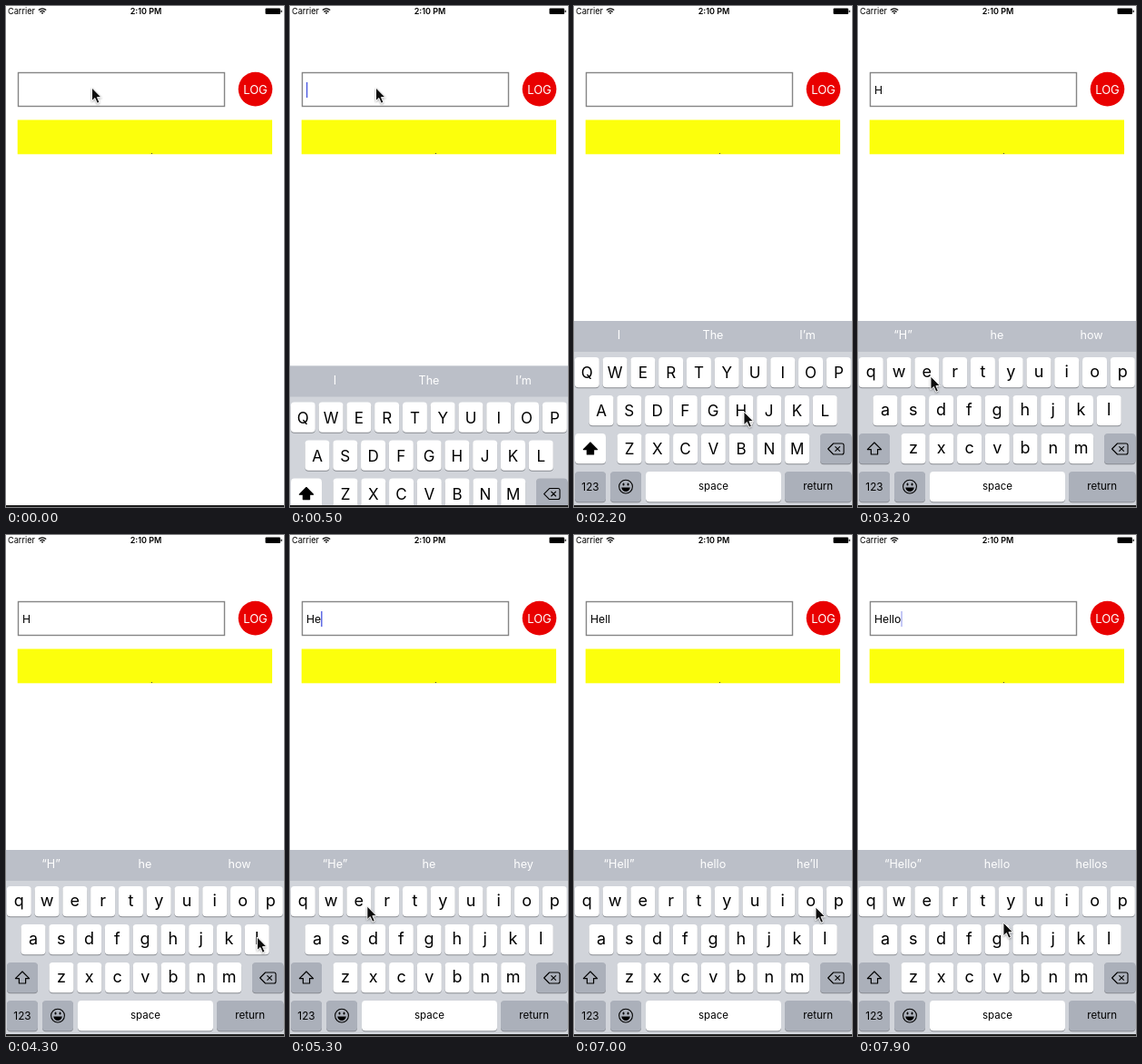
Recreate the animation shown at these times as an HTML page. Size 306x552 px, loop 8000 ms.

```html
<!DOCTYPE html>
<html lang="en">
<head>
<meta charset="utf-8">
<title>Typing on a phone keyboard</title>
<style>
  html, body { margin: 0; width: 100%; height: 100%; overflow: hidden; background: #fff; }
  svg { display: block; width: 306px; height: 552px; overflow: hidden; }
  text { font-family: Inter, Roboto, "Liberation Sans", sans-serif; white-space: pre; }
  .mid { text-anchor: middle; }
</style>
</head>
<body>
<svg id="stage" viewBox="0 0 306 552" xmlns="http://www.w3.org/2000/svg">
  <defs>
    <filter id="soft" x="-50%" y="-50%" width="200%" height="200%">
      <feDropShadow dx="0" dy="1" stdDeviation="1.2" flood-color="#000" flood-opacity=".4"/>
    </filter>
  </defs>
  <rect width="306" height="552" fill="#fff"/>

  <!-- status bar -->
  <text x="2" y="9.2" font-size="9.2">Carrier</text>
  <g fill="none" stroke="#000" stroke-width="1.3">
    <path d="M35.8 4.6Q40 1.2 44.2 4.6M37.4 6.4Q40 4.3 42.6 6.4"/>
    <path d="M38.6 7.4Q40 6.4 41.4 7.4L40 9Z" fill="#000" stroke="none"/>
  </g>
  <text class="mid" x="154" y="9.2" font-size="9" font-weight="600">2:10 PM</text>
  <rect x="285.5" y="2.5" width="16.5" height="6.5" rx="1"/>
  <rect x="302.6" y="4.4" width="1.2" height="2.6" rx=".6"/>

  <!-- form -->
  <rect x="13.5" y="73.5" width="227" height="37" fill="#fff" stroke="#858585" stroke-width="1.4"/>
  <text id="field" x="18" y="97" font-size="12.2"></text>
  <rect id="caret" y="84" width="1.3" height="17" fill="#4654e0"/>
  <circle cx="274.5" cy="91.6" r="18.8" fill="#e90000"/>
  <text class="mid" x="274.5" y="96.5" font-size="13" fill="#fff">LOG</text>
  <rect x="12.7" y="125.5" width="280.3" height="37.8" fill="#fcff0c"/>
  <rect x="160" y="162" width="1" height="1" fill="#444"/>

  <g id="board"></g>
  <rect y="550" width="306" height="2" fill="#1c1c1c"/>
  <path id="mouse" d="M0 0V14.6L3.4 11.5L5.9 17.2L8.4 16.1L5.9 10.6H10.4Z"
        fill="#0a0a0a" stroke="#fff" stroke-width=".9" filter="url(#soft)"/>
</svg>
<script>
const LOOP = 8000;
const $ = id => document.getElementById(id);
const board = $('board'), field = $('field'), caret = $('caret'), mouse = $('mouse');

function add(parent, tag, attrs, text) {
  const el = document.createElementNS('http://www.w3.org/2000/svg', tag);
  for (const k in attrs) el.setAttribute(k, attrs[k]);
  if (text) el.textContent = text;
  return parent.appendChild(el);
}

const label = (x, y, size, text, fill = '#000', parent = board) =>
  add(parent, 'text', { class: 'mid', x, y, 'font-size': size, fill }, text);

const GREY = '#abb0ba';
function keyCap(x, y, w, fill = '#fff') {
  add(board, 'rect', { x, y: y + 1, width: w, height: 33.2, rx: 4, fill: '#888b91' });
  return add(board, 'rect', { x, y, width: w, height: 33.2, rx: 4, fill });
}

// keyboard
add(board, 'rect', { y: 347, width: 306, height: 205, fill: '#d1d4da' });
add(board, 'rect', { y: 347, width: 306, height: 34, fill: '#bbbfc8' });
const hints = [49.5, 153, 257].map(x => label(x, 367, 12.6, '', '#fff'));

const keys = {};
[['qwertyuiop', 14.3, 387], ['asdfghjkl', 30, 429], ['zxcvbnm', 61, 471]].forEach(([row, x0, y]) =>
  [...row].forEach((ch, i) => {
    const x = x0 + i * 30.78;
    keyCap(x - 13.5, y, 27);
    keys[ch] = { x, y, text: label(x, y + 22, 18, ch) };
  }));

const shiftCap = keyCap(1, 471, 34);
const shiftIcon = add(board, 'path', {
  d: 'M18 481L25.6 488.6H21.6V494H14.4V488.6H10.4Z',
  stroke: '#000', 'stroke-width': 1.2, 'stroke-linejoin': 'round'
});
keyCap(271, 471, 34.5, GREY);
add(board, 'path', {
  d: 'M285.5 482H295Q297 482 297 484V492Q297 494 295 494H285.5L279.6 488ZM287.4 485.3L292.8 490.7M292.8 485.3L287.4 490.7',
  fill: 'none', stroke: '#000', 'stroke-width': 1.1, 'stroke-linejoin': 'round'
});

keyCap(1, 513, 34, GREY);
label(18, 533.5, 11.8, '123');
keyCap(40, 513, 34, GREY);
add(board, 'circle', { cx: 57, cy: 529.6, r: 7.4, fill: 'none', stroke: '#000', 'stroke-width': 1.1 });
add(board, 'path', { d: 'M52.2 530.6H61.8Q61 535 57 535T52.2 530.6Z' });
for (const cx of [54.5, 59.5]) add(board, 'ellipse', { cx, cy: 527, rx: 1, ry: 1.5 });
keyCap(79, 513, 149);
label(153.5, 532.5, 11.5, 'space');
keyCap(232, 513, 73.5, GREY);
label(268.7, 532.5, 11.5, 'return');

// magnified key, drawn around the top centre of a key
const popup = add(board, 'g', { filter: 'url(#soft)' });
add(popup, 'path', {
  d: 'M-18 -47H18Q24 -47 24 -41V-17C24 -6 13.5 -6 13.5 4V29Q13.5 33 9.5 33H-9.5Q-13.5 33 -13.5 29V4C-13.5 -6 -24 -6 -24 -17V-41Q-24 -47 -18 -47Z',
  fill: '#fff'
});
const popupText = label(0, -16, 25, '', '#000', popup);

// [time, field text, suggestions]
const typed = [
  [420, '', 'I|The|I’m'],
  [2600, 'H', '“H”|he|how'],
  [5200, 'He', '“He”|he|hey'],
  [5950, 'Hel', '“Hel”|hello|hell'],
  [6300, 'Hell', '“Hell”|hello|he’ll'],
  [7350, 'Hello', '“Hello”|hello|hellos']
];

// [from, to, key]
const presses = [
  [2350, 2650, 'h'], [5050, 5250, 'e'], [5800, 6000, 'l'], [6150, 6350, 'l'], [7050, 7390, 'o']
];

// [time, x, y] of the pointer tip
const path = [
  [0, 94.5, 90], [1300, 94.5, 90], [2200, 187, 447], [2700, 187, 447], [3150, 80, 408],
  [3450, 80, 408], [4250, 276.5, 443], [4600, 276.5, 443], [5000, 79, 408], [5250, 79, 408],
  [5750, 282, 443.5], [6350, 282, 443.5], [6650, 266, 410], [7390, 266, 410], [7800, 160, 427], [LOOP, 160, 427]
];

const smooth = p => p * p * (3 - 2 * p);
const clamp = p => Math.min(1, Math.max(0, p));

function pointer(t) {
  const i = path.findIndex(p => p[0] > t);
  const [t0, x0, y0] = path[i - 1], [t1, x1, y1] = path[i];
  const p = smooth((t - t0) / (t1 - t0));
  return [x0 + (x1 - x0) * p, y0 + (y1 - y0) * p];
}

// cubic-bezier(.38, .7, .125, 1)
function slide(x) {
  if (x <= 0 || x >= 1) return clamp(x);
  const curve = (u, a, b) => 3 * (1 - u) * (1 - u) * u * a + 3 * (1 - u) * u * u * b + u * u * u;
  let lo = 0, hi = 1;
  for (let i = 0; i < 20; i++) {
    const mid = (lo + hi) / 2;
    if (curve(mid, .38, .125) < x) lo = mid; else hi = mid;
  }
  return curve(lo, .7, 1);
}

function caretAlpha(age) {
  const a = age % 1000;
  return a < 500 ? 1 : a < 600 ? (600 - a) / 100 : a < 900 ? 0 : (a - 900) / 100;
}

let shown;
function setState(state) {
  if (state === shown) return;
  shown = state;
  const [, text, words] = state;
  field.textContent = text;
  words.split('|').forEach((w, i) => hints[i].textContent = w);
  const upper = !text;
  for (const ch in keys) {
    const { y, text: el } = keys[ch];
    el.textContent = upper ? ch.toUpperCase() : ch;
    el.setAttribute('y', y + (upper ? 23 : 21.5));
    el.setAttribute('font-size', upper ? 17 : 18);
  }
  shiftCap.setAttribute('fill', upper ? '#fff' : GREY);
  shiftIcon.setAttribute('fill', upper ? '#000' : 'none');
}

function render(t) {
  const state = typed.filter(s => s[0] <= t).pop() || typed[0];
  setState(state);
  const width = state[1] ? field.getComputedTextLength() : 0;
  caret.setAttribute('x', 18 + width);
  caret.setAttribute('opacity', t < state[0] ? 0 : caretAlpha(t - state[0]));

  board.setAttribute('transform', `translate(0 ${205 * (1 - slide((t - 345) / 500))})`);
  board.setAttribute('visibility', t < 345 ? 'hidden' : 'visible');

  const press = presses.find(p => t >= p[0] && t < p[1]);
  popup.setAttribute('display', press ? 'inline' : 'none');
  if (press) {
    const key = keys[press[2]];
    popup.setAttribute('transform', `translate(${key.x} ${key.y})`);
    popupText.textContent = key.text.textContent;
  }
  mouse.setAttribute('transform', `translate(${pointer(t)})`);
}

const start = performance.now();
function tick() {
  render((performance.now() - start) % LOOP);
  requestAnimationFrame(tick);
}
tick();
</script>
</body>
</html>
```
